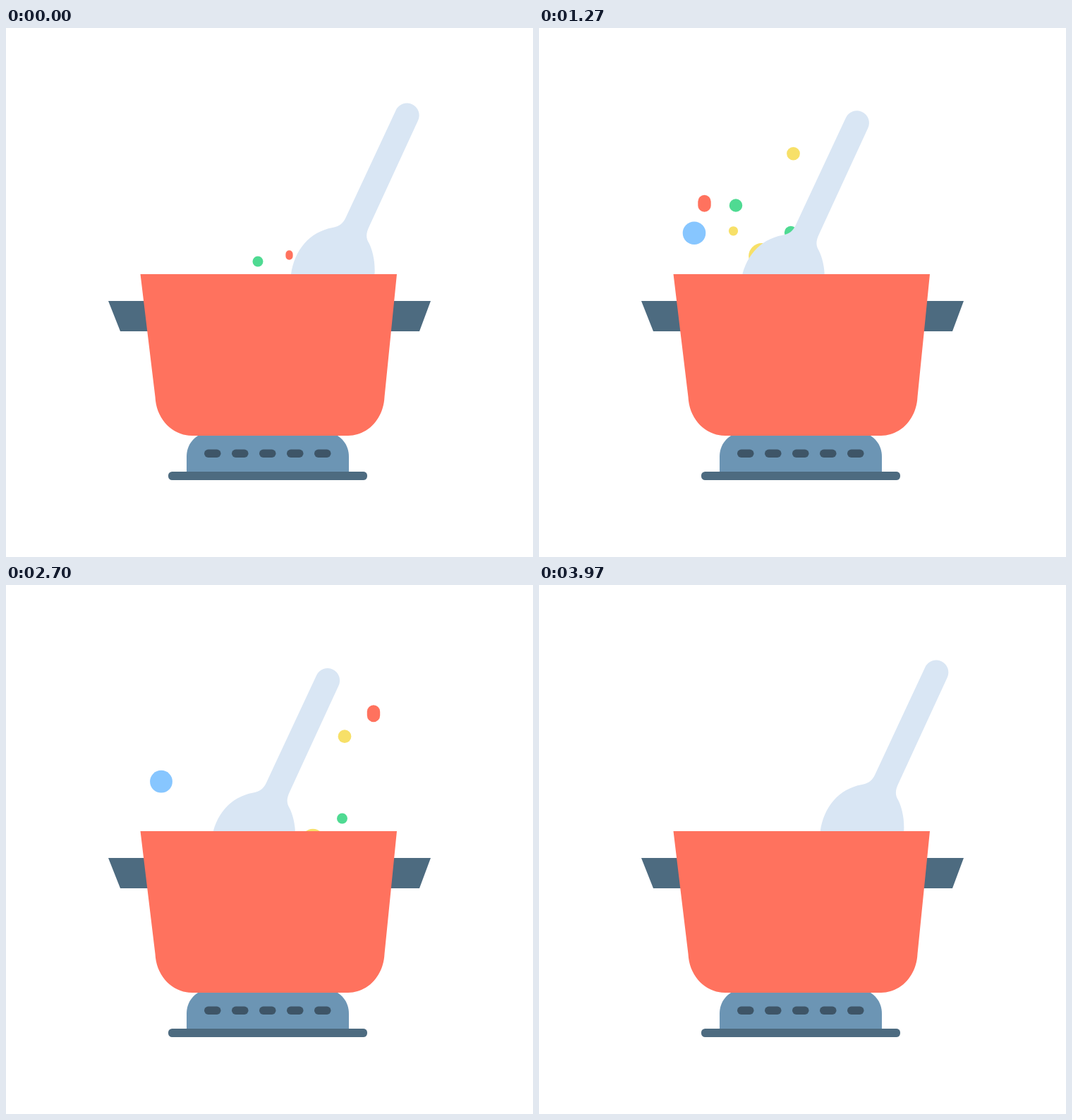
Animation, 747 px wide and 750 px high, one loop 4010 ms. Source, as an HTML page:

```html
<!DOCTYPE html>
<html lang="en">
<head>
<meta charset="utf-8">
<title>Cooking pot</title>
<style>
  html, body { margin: 0; width: 100%; height: 100%; overflow: hidden; background: #fff; }
  svg { display: block; width: 100%; height: 100%; }
</style>
</head>
<body>
<svg viewBox="0 0 747 750">
  <g id="bubbles"></g>
  <path id="spoon" fill="#d9e6f4" d="M552.7 116.5A17.3 17.3 0 0 1 584 131.3L515 281C510 291 510 298 514.500 305C520 316 523.500 332 522.500 349L521 372H406L404 349C409 315 430 289 463 283C472 281.500 478 277 481.500 269Z"/>
  <path fill="#4d6b80" d="M145 387H220V430H162ZM602 387H530V430H586Z"/>
  <path fill="#6c95b4" d="M256 630V608C256 590 267 578 283 573H459C475 578 486 590 486 608V630Z"/>
  <rect fill="#4d6b80" x="230" y="629" width="282" height="12" rx="5.500"/>
  <g id="slots" fill="#3e5567"></g>
  <path fill="#ff725e" d="M190.500 349H554L536.500 523C535 555 512 578 485 578H264C236 578 213 555 211.500 523Z"/>
</svg>
<script>
const LOOP = 4010, FRAME = 100 / 3, LAST_FRAME = 119;
const GROW = 775;

// Each group mirrors the same set of bubbles around its own x.
const groups = [
  { x: 357, side: 1, delay: 0 },
  { x: 279, side: -1, delay: 750 },
  { x: 476.5, side: 1, delay: 1700 }
];

// rise: [time, y] points; fade: start and end of the shrinking; repeat: delay of a second bubble
const kinds = [
  { dx: 0, w: 18.4, h: 18.4, color: '#4fda92', born: -630, fade: [600, 790], repeat: 1000,
    rise: [[0, 331], [517, 251.5]] },
  { dx: 3.5, w: 18.8, h: 18.8, color: '#f7e068', born: -30, fade: [1450, 1700],
    rise: [[-30, 357], [433, 299], [567, 281], [1083, 202], [1267, 178], [1517, 148]] },
  { dx: 44.5, w: 18.4, h: 24, color: '#ff725e', born: -430, fade: [1000, 1200],
    rise: [[-430, 353], [-320, 349], [0, 322], [118, 305], [433, 261.5], [567, 241], [1083, 171]] },
  { dx: 59, w: 32.6, h: 32.6, color: '#87c6ff', born: -610, fade: [590, 790], repeat: 1355,
    rise: [[133, 350], [567, 283]] },
  { dx: -41.5, w: 36.6, h: 36.6, color: '#f7e068', born: 310, fade: [1590, 1790],
    rise: [[1083, 350], [1517, 287]] }
];

const clamp = v => Math.max(0, Math.min(1, v));
const byId = id => document.getElementById(id);

function addRect(parent, attrs) {
  const el = document.createElementNS('http://www.w3.org/2000/svg', 'rect');
  setAttrs(el, attrs);
  return parent.appendChild(el);
}

function setAttrs(el, attrs) {
  for (const key in attrs) el.setAttribute(key, attrs[key]);
}

// Linear between points, continued past both ends.
function along(points, t) {
  let i = 1;
  while (i < points.length - 1 && t > points[i][0]) i++;
  const [t0, y0] = points[i - 1], [t1, y1] = points[i];
  return y0 + (y1 - y0) * (t - t0) / (t1 - t0);
}

for (let i = 0; i < 5; i++) {
  addRect(byId('slots'), { x: 281 + 39 * i, y: 597.5, width: 23.5, height: 11.5, rx: 5.7 });
}

const bubbles = [];
for (const group of groups) {
  for (const kind of kinds) {
    for (const wait of kind.repeat ? [0, kind.repeat] : [0]) {
      bubbles.push({
        kind,
        start: group.delay + wait,
        x: group.x + group.side * kind.dx,
        el: addRect(byId('bubbles'), { fill: kind.color })
      });
    }
  }
}

function drawBubble({ kind, start, x, el }, time) {
  const t = time - start;
  const grown = clamp((t - kind.born) / GROW);
  const left = clamp((kind.fade[1] - t) / (kind.fade[1] - kind.fade[0]));
  const round = kind.w === kind.h;
  const w = kind.w * grown * (round ? left : 1 - (1 - left) ** 3);
  const h = kind.h * grown * left;
  const y = along(kind.rise, t);
  setAttrs(el, { x: x - w / 2, y: y - h / 2, width: w, height: h, rx: w / 2, ry: Math.min(w, h) / 2 });
}

// Two strokes to the left and back per loop, sinking in the middle of the loop.
function drawSpoon(time) {
  const swing = 1 - Math.abs((time / 1000) % 2 - 1);
  const half = 2 - Math.abs(time / 1000 - 2);
  const u = half - 1;
  const dip = half < 1 ? 4.3 * half ** 3 : 4.3 + 26 * u - 8 * u * u;
  const dx = -158 * swing - 1.5 * half;
  byId('spoon').setAttribute('transform', `translate(${dx} ${dip})`);
}

function render(ms) {
  const frame = Math.min(LAST_FRAME, Math.floor((ms % LOOP + 3.4) / FRAME));
  const time = frame * FRAME;
  drawSpoon(time);
  for (const bubble of bubbles) drawBubble(bubble, time);
}

const begin = performance.now();
function tick() {
  render(performance.now() - begin);
  requestAnimationFrame(tick);
}
tick();
</script>
</body>
</html>
```
